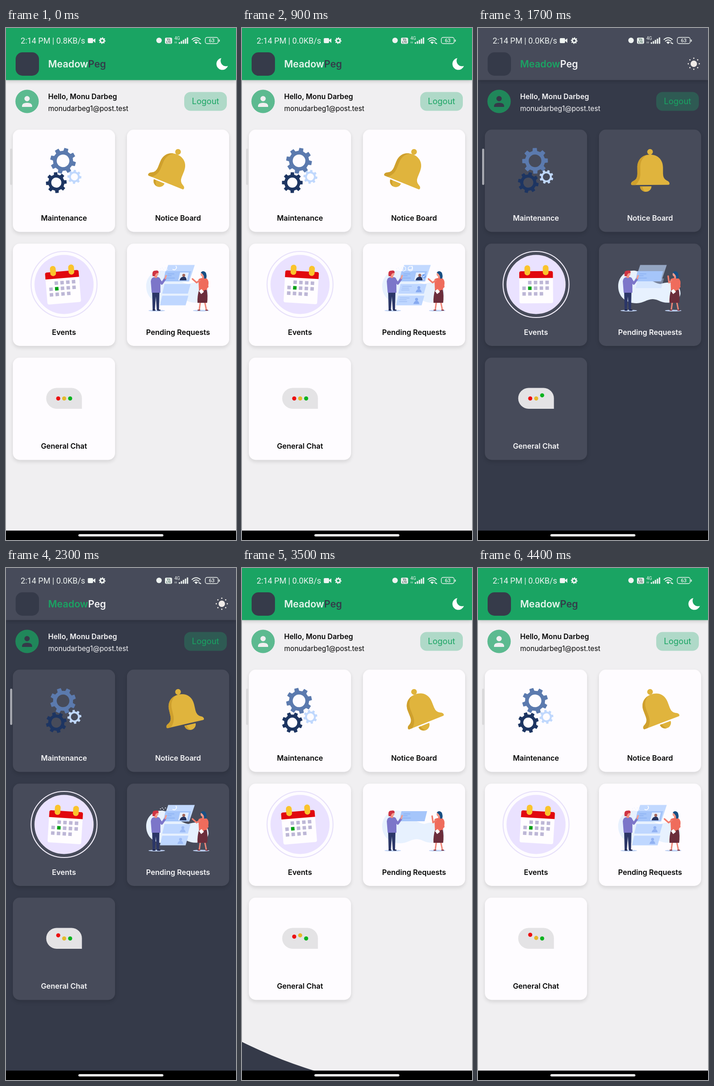
These frames come from a looping animation (502 px wide and 1116 px high, 4.5 s). An HTML page:

```html
<!DOCTYPE html>
<html lang="en">
<head>
<meta charset="utf-8">
<title>Dashboard theme switch</title>
<style>
html, body { margin: 0; width: 100%; height: 100%; overflow: hidden; background: #000; }
svg { display: block; width: 100vw; height: 100vh; }
text { font-family: Inter, "Open Sans", sans-serif; }
.status text { font-family: Roboto, Inter, sans-serif; }
.label { font-size: 16px; font-weight: 600; text-anchor: middle; }
</style>
</head>
<body>
<svg id="stage" viewBox="0 0 502 1116" preserveAspectRatio="none">
  <defs>
    <clipPath id="reveal"><circle id="hole" cx="471" cy="79" r="0"/></clipPath>
    <clipPath id="headerClip"><rect width="502" height="113"/></clipPath>
    <filter id="soft" x="-10%" y="-10%" width="120%" height="125%"><feGaussianBlur stdDeviation="4"/></filter>
  </defs>
  <g id="scenes"></g>
  <rect y="1095.5" width="502" height="21"/>
  <rect x="158" y="1103.3" width="185.5" height="5" rx="2.5" fill="#fff"/>
</svg>
<script>
const LOOP = 4500, STEP = 100;
const SWITCH_DARK = 1168.5, SWITCH_LIGHT = 3220;
const SPREAD = 3.8, FULL_RADIUS = 1140;

const themes = {
  light: {
    header: '#1aa463', page: '#f0eff1', card: '#fefcff', shadow: .11, text: '#050505',
    brandA: '#e9f6ef', brandB: '#333b49', logo: '#363b4a', handle: '#d9d8da',
    avatar: '#5cba90', person: '#f0eff1', button: '#afd9c8', ring: '#e7e0fa'
  },
  dark: {
    header: '#474b5a', page: '#353a49', card: '#474b5a', shadow: .14, text: '#f6f6f8',
    brandA: '#1aa463', brandB: '#f4f4f6', logo: '#353a49', handle: '#a7a9b1',
    avatar: '#20875a', person: '#353a49', button: '#2e5a53', ring: '#f0ecf8'
  }
};

const clamp = (v, a = 0, b = 1) => Math.min(b, Math.max(a, v));
const ramp = (v, a, b) => clamp((v - a) / (b - a));
const mod = (v, n) => ((v % n) + n) % n;

// Linear interpolation through [time, value] points.
function along(points, x) {
  const i = points.findIndex(p => p[0] > x);
  if (i < 1) return points[i < 0 ? points.length - 1 : 0][1];
  const [a, b] = [points[i - 1], points[i]];
  return a[1] + (b[1] - a[1]) * (x - a[0]) / (b[0] - a[0]);
}

const rect = (x, y, w, h, fill, rx = 0, more = '') =>
  `<rect x="${x}" y="${y}" width="${w}" height="${h}" rx="${rx}" fill="${fill}" ${more}/>`;
const circle = (x, y, r, fill, more = '') =>
  `<circle cx="${x}" cy="${y}" r="${r}" fill="${fill}" ${more}/>`;
const path = (d, fill, more = '') => `<path d="${d}" fill="${fill}" ${more}/>`;
const line = (d, color, width) =>
  path(d, 'none', `stroke="${color}" stroke-width="${width}" stroke-linecap="round" stroke-linejoin="round"`);
const text = (x, y, size, fill, body, more = '') =>
  `<text x="${x}" y="${y}" font-size="${size}" fill="${fill}" ${more}>${body}</text>`;

function gear(name, x, y, outer, inner, hole, fill) {
  const teeth = 8, pitch = 2 * Math.PI / teeth, pts = [];
  for (let i = 0; i < teeth; i++)
    for (const [f, r] of [[-.29, inner], [-.2, outer], [.2, outer], [.29, inner]]) {
      const a = (i + f) * pitch - Math.PI / 2;
      pts.push(`${(r * Math.cos(a)).toFixed(2)} ${(r * Math.sin(a)).toFixed(2)}`);
    }
  const ring = `M${-hole} 0a${hole} ${hole} 0 1 0 ${2 * hole} 0a${hole} ${hole} 0 1 0 ${-2 * hole} 0Z`;
  return `<g transform="translate(${x} ${y})">` +
    path(`M${pts.join('L')}Z${ring}`, fill, `class="${name}" fill-rule="evenodd"`) + '</g>';
}

function statusBar() {
  const c = '#eef3f1';
  const bars = [0, 1, 2, 3, 4].map(i => rect(377 + i * 4.4, 31 - i * 2.6, 3, 3.5 + i * 2.6, c, 1)).join('');
  return `<g class="status">
    ${text(32, 34, 17.6, c, '2:14 PM | <tspan class="speed">0.8</tspan>KB/s')}
    ${rect(178.5, 22, 11.5, 11, c, 2)}${path('M189 27L195 22.5V32.5Z', c)}
    <g transform="translate(210 27.5)">${path(cogOutline(), c, 'fill-rule="evenodd"')}</g>
    ${circle(334, 27, 6, c)}
    ${rect(347, 21, 15.5, 13.5, c, 3)}
    ${text(354.7, 27.3, 6.5, '#4b6b60', 'Vo', 'text-anchor="middle" font-weight="700"')}
    ${text(354.7, 33.2, 6.5, '#4b6b60', 'LTE', 'text-anchor="middle" font-weight="700"')}
    ${text(367.5, 25.5, 10, c, '4G')}${line('M369 30V33M372 30V33', c, 1)}${bars}
    ${line('M406 25Q415 17.5 424 25M409 28.5Q415 23.5 421 28.5', c, 2)}${path('M411 31Q415 28 419 31L415 35Z', c)}
    ${line('M421 32l4 2', c, 2)}
    ${rect(435, 20.5, 28, 13.5, 'none', 4, `stroke="${c}" stroke-width="1.4"`)}
    ${rect(464.5, 25, 2, 5, c, 1)}
    ${text(449, 31.3, 11, c, '63', 'text-anchor="middle" font-weight="500"')}
  </g>`;
}

function cogOutline() {
  const pts = Array.from({ length: 24 }, (_, i) => {
    const r = i % 3 === 2 ? 5 : 7.3, a = i * Math.PI / 12;
    return `${(r * Math.cos(a)).toFixed(2)} ${(r * Math.sin(a)).toFixed(2)}`;
  });
  return `M${pts.join('L')}ZM-2.6 0a2.6 2.6 0 1 0 5.2 0a2.6 2.6 0 1 0 -5.2 0Z`;
}

function modeIcon(name) {
  if (name === 'light') return path('M470 65.5A13 13 0 1 0 484.5 82.5A11.8 11.8 0 0 1 470 65.5Z', '#fff');
  let dots = circle(471, 78, 7, '#f0ebe8');
  for (let i = 0; i < 8; i++) {
    const a = i * Math.PI / 4;
    dots += circle(471 + 12 * Math.cos(a), 78 + 12 * Math.sin(a), 1.4, '#f0ebe8');
  }
  return dots;
}

function card(t, x, y, label) {
  return rect(x, y + 4, 223, 223, '#000', 15, `opacity="${t.shadow}" filter="url(#soft)"`) +
    rect(x, y, 223, 223, t.card, 15) +
    `<text class="label" x="${x + 111.5}" y="${y + 198.5}" fill="${t.text}">${label}</text>`;
}

function bell() {
  const body = 'M333.5 339Q334 335 339 333Q347.5 329 347.5 318V304C347.5 286 360 276 375.5 276' +
    'S403.5 286 403.5 304V318Q403.5 329 412 333Q417 335 417.5 339Q417.5 342 415 342H336Q333.5 342 333.5 339Z';
  const shade = 'M333.5 339Q334 335 339 333Q347.5 329 347.5 318V304C347.5 288 357 279 368 276.8' +
    'C357 284 354 293 354 305V320Q353 333 343 342H336Q333.5 342 333.5 339Z';
  return `<g class="bell">${circle(375.5, 270, 6.2, '#dfb33c')}
    <g class="clapper">${path('M363 345H388A12.5 12 0 0 1 363 345Z', '#dfb33c')}${path('M363 345H368Q369 352 374 356.8A12.5 12 0 0 1 363 345Z', '#cfa02d')}</g>
    ${path(body, '#e0b43d')}${path(shade, '#cfa02d')}</g>`;
}

function calendar(t) {
  let days = '';
  for (let row = 0; row < 3; row++)
    for (let col = 0; col < 5; col++) {
      if ((row === 0 && col === 0) || (row === 2 && col === 4)) continue;
      const today = row === 1 && col === 1;
      days += rect(97 + col * 12.6, 551 + row * 12.3, 7.6, 7.6, today ? '#00a014' : '#bdb7d6');
    }
  return circle(126.7, 559, 72, 'none', `stroke="${t.ring}" stroke-width="2.2"`) +
    circle(126.7, 559, 64.5, '#eae2ff') +
    `<g class="calendar">${rect(90.5, 531, 73.5, 69, '#fffdff', 4)}
    ${path('M90.5 545V534Q90.5 530 94.5 530H160Q164 530 164 534V545Z', '#e1080e')}${days}
    ${rect(102, 517, 12.5, 22, '#fac42c', 6)}${rect(142, 517, 12.5, 22, '#fac42c', 6)}</g>`;
}

function profile(x, y) {
  return circle(x, y - 3, 3.2, '#87aaf0') + path(`M${x - 7} ${y + 7}Q${x - 5} ${y} ${x} ${y}T${x + 6} ${y + 7}Z`, '#87aaf0');
}

function requests() {
  const blob = 'M306 563C306 540 325 527 343 529C363 533 372 553 398 558C425 549 442 560 442 579' +
    'C440 598 412 604 394 594C372 585 366 600 346 600C322 600 306 585 306 563Z';
  const rows = [['rowA', 558, 346], ['rowB', 583.5, 341]].map(([name, y, x]) =>
    `<g class="${name}">${path(`M${x} ${y}H${x + 57}L${x + 51} ${y + 21}H${x - 5}Z`, '#bfd7ff')}
      <g class="icons">${profile(x + 40, y + 11)}</g>
      <g class="lines">${line(`M${x + 4} ${y + 5}h20M${x + 3} ${y + 9}h15M${x + 2} ${y + 13}h17`, '#93b4f0', 1)}</g></g>`).join('');
  return path(blob, '#e7f1fe') +
    `<g class="panel">${path('M354 516.5H412L400 552.5H342Z', '#c2d9ff')}</g>${rows}
    ${path('M348 530H404L398.5 552H343.5Z', '#a5c5fa')}
    ${line('M353 536h14M352 540h9M351 545h17', '#7da5ee', 1)}
    <g class="photo">${path('M380 533H399L395 550H376Z', '#e5eeff')}${path('M379 550Q380 543 387 542T394 550Z', '#26345f')}${circle(388, 539, 3.2, '#a4675c')}</g>
    <g class="loader">${line('M364 526a5 5 0 0 0 7 -7', '#fff', 1.6)}${line('M337 525h.1M341 523h.1M344 526h.1M348 523h.1M352 526h.1', '#eef4ff', 2)}</g>
    <g class="check">${line('M356 521a5 5 0 1 0 .2 .2M371 521a5 5 0 1 0 .2 .2', '#f7faff', 1.5)}
      ${circle(397, 541, 4.5, '#73a0f2')}${line('M394.8 541l1.8 2 3-4', '#fff', 1.2)}</g>
    <ellipse cx="329" cy="616" rx="18" ry="1.7" fill="#bfd2f4"/><ellipse cx="426" cy="616" rx="18" ry="1.7" fill="#bfd2f4"/>
    ${path('M319 574H335L334 614H329L327 585L325 614H320Z', '#2b3667')}${line('M321 615h4M331 615h5', '#1c244c', 2.4)}
    ${path('M316 552Q317 543 325 543H332Q337 544 337 550V577H318Z', '#7c76c9')}
    ${line('M334 548L340 557L347 547', '#7c76c9', 5)}${line('M347.5 546L349.5 540', '#f49b8c', 3.2)}
    ${rect(324, 537, 6, 8, '#f08e80', 2)}${circle(327.5, 535.5, 5.3, '#f49b8c')}
    ${path('M320 541Q318 529 325 529Q334 527 333 534Q326 533 325 541Z', '#cf3443')}
    ${line('M424 598L422 613M434 598L437 613', '#f08676', 3)}${line('M419 615h4M436 615h4', '#7a2734', 2)}
    ${path('M422 569H438Q441 584 439 599H418Q417 584 422 569Z', '#6b2d3b')}
    ${path('M420 548Q425 544 435 545Q443 547 442 558L438 571H421Z', '#ef6c5c')}
    ${line('M438 551L440 564L428 573', '#ef6c5c', 4)}
    ${path('M421 573L427 569L432 575L426 580Z', '#fff')}
    <g class="armUp">${line('M423 550L417 555L415 541', '#f17c6c', 3.4)}</g>
    <g class="armDown">${line('M423 550L416 555L407 547', '#f17c6c', 3.4)}</g>
    ${rect(428, 538, 5, 8, '#f08676', 2)}${circle(429.5, 537, 4.8, '#f49b8c')}
    ${path('M425 533Q430 527 436 533Q439 540 437 546H432Q434 539 425 533Z', '#174f83')}`;
}

function chat() {
  const colors = ['#ec1010', '#e5b92c', '#0bb31f'];
  return path('M110.5 784.5H143A22.7 22.7 0 0 1 165.7 807.2V830H110.5A22.7 22.7 0 0 1 110.5 784.5Z', '#e4e3e5') +
    colors.map((c, i) => circle(114 + i * 13, 807.5, 4.5, c, 'class="dot"')).join('');
}

function scene(name) {
  const t = themes[name];
  return rect(0, 0, 502, 1096, t.page) +
    rect(0, 3, 502, 112, '#000', 0, 'opacity=".22" filter="url(#soft)"') +
    rect(0, 0, 502, 113.5, t.header) +
    circle(471, 79, 0, '#30323e', 'class="ripple" opacity=".08" clip-path="url(#headerClip)"') +
    statusBar() + rect(21, 53, 51, 51, t.logo, 15) +
    text(92, 86, 21, t.brandA, `Meadow<tspan fill="${t.brandB}">Peg</tspan>`, 'font-weight="600"') +
    modeIcon(name) +
    circle(46, 160, 25.5, t.avatar) + circle(46, 154, 5.8, t.person) +
    path('M35 172V169Q36 163 46 163T57 169V172Z', t.person) +
    text(92, 154.5, 15.7, t.text, 'Hello, Monu Darbeg', 'font-weight="600"') +
    text(92, 181, 15.2, t.text, 'monudarbeg1@post.test') +
    rect(389, 139.5, 93, 41, t.button, 14) +
    text(435.5, 166, 18, '#1aa463', 'Logout', 'text-anchor="middle"') +
    card(t, 15, 221.5, 'Maintenance') + card(t, 264, 221.5, 'Notice Board') +
    card(t, 15, 470, 'Events') + card(t, 264, 470, 'Pending Requests') + card(t, 15, 718.5, 'General Chat') +
    rect(9, 263, 4.6, 79, t.handle, 2) +
    gear('gearBig', 124.5, 289.5, 28.3, 22, 13.8, '#5b7aae') +
    gear('gearSmall', 149.3, 324.5, 15.3, 11.8, 7.7, '#c0d8fd') +
    gear('gearDark', 109.8, 337, 22.8, 17.8, 11, '#1d3562') +
    bell() + calendar(t) + requests() + chat();
}

const BELL = [[0, 14], [50, 9.5], [150, -13], [200, -20.8], [250, -23], [300, -21.8], [555, 0], [815, 22], [865, 23.5], [915, 22], [1000, 14]];
const CLAPPER = [[0, -7], [50, -3], [150, 9.5], [200, 7], [300, -7], [815, -13], [915, -14], [1000, -7]];

const holder = document.getElementById('scenes');
const hole = document.getElementById('hole');

function build(name) {
  const root = document.createElementNS('http://www.w3.org/2000/svg', 'g');
  root.innerHTML = scene(name);
  holder.append(root);
  const all = sel => [...root.querySelectorAll('.' + sel)];
  const set = (sel, attr, value) => all(sel).forEach(el => el.setAttribute(attr, value));
  return { root, all, set };
}
const light = build('light'), dark = build('dark');

// `age` is the time since the icons of this scene started to play.
function pose(view, age) {
  const { set, all } = view, p = mod(age, 1000);
  const loading = age < 180;
  const turn = (p < 500 ? p : p - 1000) * .045;
  set('gearBig', 'transform', `rotate(${turn + 19})`);
  set('gearSmall', 'transform', `rotate(${-turn})`);
  set('gearDark', 'transform', `rotate(${-turn - 8})`);
  set('bell', 'transform', `rotate(${loading ? 0 : along(BELL, p)} 375.5 270)`);
  set('clapper', 'transform', `translate(${loading ? 0 : along(CLAPPER, p)} 0)`);

  const shake = loading ? 0 : -4.9 * ramp(p, 90, 170) * Math.cos(2 * Math.PI * (p - 315) / 307);
  set('calendar', 'transform', `rotate(${shake} 127 599)`);
  all('dot').forEach((dot, i) => {
    const k = ramp(p, i * 150, i * 150 + 400);
    dot.setAttribute('cy', 807.5 - 8 * Math.sin(Math.PI * k) ** 2);
  });

  set('panel', 'opacity', ramp(age, 380, 650));
  [['rowA', 450], ['rowB', 600]].forEach(([row, start]) => {
    const k = ramp(age, start, start + 250);
    set(row, 'opacity', k);
    set(row, 'transform', `translate(${5 * (1 - k)} ${-20 * (1 - k)})`);
  });
  set('photo', 'opacity', ramp(age, 650, 850));
  set('loader', 'opacity', ramp(age, 700, 900));
  set('icons', 'opacity', ramp(age, 1000, 1250));
  set('lines', 'opacity', ramp(age, 1300, 1700));
  set('check', 'opacity', ramp(age, 1400, 1700));
  set('armUp', 'opacity', age < 600 ? 1 : 0);
  set('armDown', 'opacity', age < 600 ? 0 : 1);
}

function ripple(view, t, start) {
  const since = t - (start - 140);
  view.set('ripple', 'r', since > 0 && t < start ? 14 + since * .25 : 0);
}

function draw(t) {
  const darkNewest = t >= SWITCH_DARK && t < SWITCH_LIGHT;
  const [top, under] = darkNewest ? [dark, light] : [light, dark];
  const since = darkNewest ? t - SWITCH_DARK : t >= SWITCH_LIGHT ? t - SWITCH_LIGHT : Infinity;
  const radius = Math.min(since * SPREAD, FULL_RADIUS);

  // The outgoing scene stays frozen at the moment of the switch.
  pose(light, t >= SWITCH_LIGHT ? t - 3200 : Math.min(t, SWITCH_DARK) + 915);
  pose(dark, Math.max(0, Math.min(t, SWITCH_LIGHT) - 1150));
  ripple(light, t, SWITCH_DARK);
  ripple(dark, t, SWITCH_LIGHT);
  [light, dark].forEach(v => v.all('speed')[0].textContent = t < 500 ? '0.8' : '0.0');

  if (holder.lastChild !== top.root) holder.append(top.root);
  hole.setAttribute('r', radius);
  under.root.removeAttribute('clip-path');
  if (radius < FULL_RADIUS) top.root.setAttribute('clip-path', 'url(#reveal)');
  else top.root.removeAttribute('clip-path');
  under.root.style.display = radius < FULL_RADIUS ? '' : 'none';
  top.root.style.display = '';
}

const began = performance.now();
let shown = -1;
function tick() {
  const t = Math.floor((performance.now() - began) % LOOP / STEP) * STEP;
  if (t !== shown) draw(shown = t);
  requestAnimationFrame(tick);
}
tick();
</script>
</body>
</html>
```
